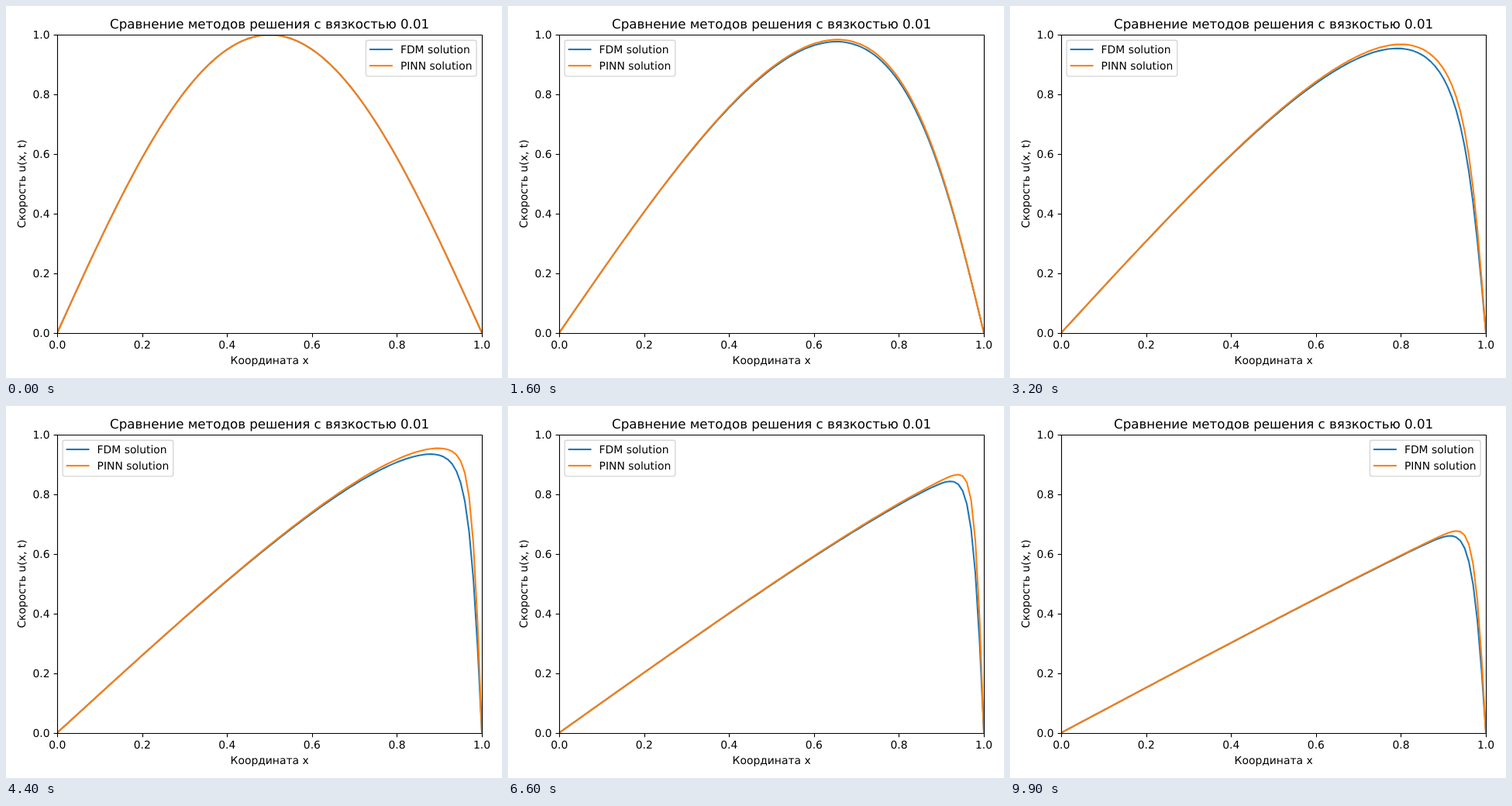
Animation of 640x480 px, one loop 10000 ms. Source, as an HTML page with a canvas:

```html
<!DOCTYPE html>
<html lang="ru">
<head>
<meta charset="utf-8">
<style>
  html, body { margin: 0; width: 100%; height: 100%; overflow: hidden; background: #fff; }
  canvas { display: block; }
</style>
</head>
<body>
<canvas id="plot" width="640" height="480"></canvas>
<script>
const ctx = document.getElementById('plot').getContext('2d');
const LEFT = 66.2, RIGHT = 614, TOP = 37.3, BOTTOM = 421.6;
const BLUE = '#1f77b4', ORANGE = '#ff7f0e';
const FRAMES = 100, N = 100, NU = 0.01, DX = 1 / N, DT = 0.001;

const px = x => LEFT + x * (RIGHT - LEFT);
const py = u => BOTTOM - u * (BOTTOM - TOP);
const snap = v => Math.floor(v + 0.5) + 0.5;
const grid = f => Array.from({ length: N + 1 }, (_, i) => f(i * DX));
const start = x => Math.sin(Math.PI * x);

// Burgers equation, explicit upwind step
const step = u => u.map((c, i) => i === 0 || i === N ? 0 :
  c - c * DT / DX * (c - u[i - 1]) + NU * DT / DX ** 2 * (u[i + 1] - 2 * c + u[i - 1]));

// Burgers equation, Cole-Hopf integral
function exact(x, t) {
  const width = Math.sqrt(4 * NU * t);
  let sum = 0, total = 0;
  for (let k = -80; k <= 80; k++) {
    const s = k / 10, y = x - s * width;
    const w = Math.exp(-s * s - (1 - Math.cos(Math.PI * y)) / (2 * Math.PI * NU));
    sum += w * start(y);
    total += w;
  }
  return sum / total;
}

const frames = [];
let fdm = grid(start);
for (let n = 0; n < FRAMES; n++) {
  frames.push({ fdm, pinn: grid(x => exact(x, n / FRAMES)) });
  for (let k = 0; k < 10; k++) fdm = step(fdm);
}

function text(str, x, y, align = 'center', size = 13.89) {
  ctx.font = `${size}px "DejaVu Sans", sans-serif`;
  ctx.textAlign = align;
  ctx.fillStyle = '#000';
  ctx.fillText(str, x, y);
}

function line(points, color, width) {
  ctx.beginPath();
  points.forEach(([x, y]) => ctx.lineTo(x, y));
  ctx.strokeStyle = color;
  ctx.lineWidth = width;
  ctx.stroke();
}

function curve(u, color) {
  line(u.map((v, i) => [px(i * DX), py(v)]), color, 2.083);
}

function axes() {
  ctx.lineCap = 'butt';
  for (let i = 0; i <= 5; i++) {
    const v = i / 5, x = px(v), y = py(v);
    line([[snap(x), 422.5], [snap(x), 427.4]], '#000', 1.11);
    line([[66.5, snap(y)], [61.6, snap(y)]], '#000', 1.11);
    text(v.toFixed(1), x, 442);
    text(v.toFixed(1), 56.5, snap(y) + 4.5, 'right');
  }
  ctx.strokeRect(66.5, 37.5, 548, 385);
  text('Сравнение методов решения с вязкостью 0.01', 340.1, 29, 'center', 16.67);
  text('Координата x', 340.1, 462);
  ctx.save();
  ctx.translate(25, 229.5);
  ctx.rotate(-Math.PI / 2);
  text('Скорость u(x, t)', 0, 0);
  ctx.restore();
}

function legend(x) {
  ctx.beginPath();
  ctx.roundRect(x, 44.2, 142.7, 46.4, 2.78);
  ctx.fillStyle = 'rgba(255,255,255,.8)';
  ctx.fill();
  ctx.strokeStyle = 'rgba(204,204,204,.8)';
  ctx.lineWidth = 1.39;
  ctx.stroke();
  ctx.lineCap = 'square';
  [['FDM solution', BLUE], ['PINN solution', ORANGE]].forEach(([name, color], i) => {
    const y = 56 + 21 * i;
    line([[x + 5.6, y], [x + 33.4, y]], color, 2.083);
    text(name, x + 44.5, y + 5, 'left');
  });
}

// The legend prefers the right corner unless a curve reaches it
const reachesCorner = u =>
  Math.max(0.3 * u[72] + 0.7 * u[73], ...u.slice(73)) > 0.861;

function draw({ fdm, pinn }) {
  ctx.fillStyle = '#fff';
  ctx.fillRect(0, 0, 640, 480);
  ctx.save();
  ctx.beginPath();
  ctx.rect(66, 37, 548, 385);
  ctx.clip();
  ctx.lineCap = 'square';
  curve(fdm, BLUE);
  curve(pinn, ORANGE);
  ctx.restore();
  axes();
  legend(reachesCorner(fdm) || reachesCorner(pinn) ? 73.1 : 464.4);
}

ctx.lineJoin = 'round';
ctx.textRendering = 'geometricPrecision';
const begin = performance.now();
function tick() {
  const n = Math.floor((performance.now() - begin) / 100) % FRAMES;
  draw(frames[n]);
  requestAnimationFrame(tick);
}
tick();
</script>
</body>
</html>
```
